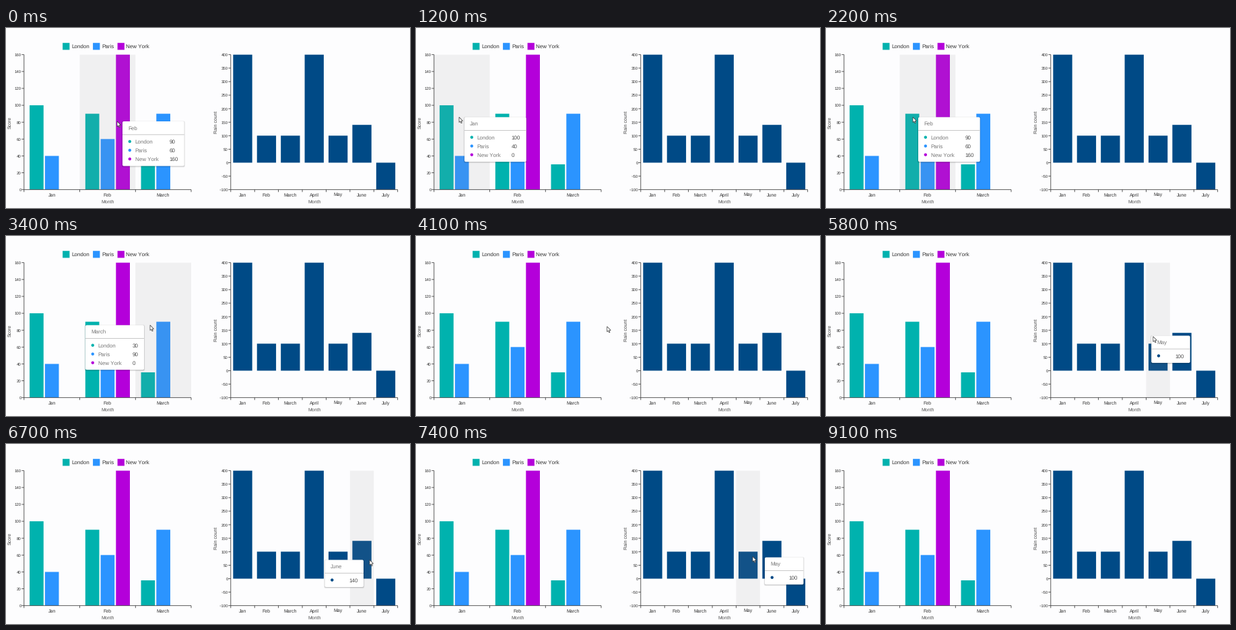
These frames come from a looping animation (600 px wide and 268 px high, 9200 ms). A matplotlib script:

```python
import matplotlib.pyplot as plt
import numpy as np
from matplotlib.animation import FuncAnimation
from matplotlib.patches import Circle, FancyBboxPatch, Polygon, Rectangle

W, H, DPI = 600, 268, 100
FRAMES, INTERVAL = 92, 100
PT = 72 / DPI
TOP, BOTTOM = 39.7, 240.7
BACKGROUND, INK, GREY = "#fdfdfe", "#333333", "#777777"
TEAL, BLUE, PURPLE, NAVY = "#00b2ae", "#2b94ff", "#b400da", "#004a86"

plt.rcParams["font.family"] = "Liberation Sans"
plt.rcParams["text.hinting"] = "none"
plt.rcParams["text.hinting_factor"] = 1
plt.rcParams["toolbar"] = "None"

fig = plt.figure(figsize=(W / DPI, H / DPI), dpi=DPI, facecolor=BACKGROUND)
ax = fig.add_axes([0, 0, 1, 1])
ax.set_xlim(0, W)
ax.set_ylim(H, 0)
ax.axis("off")


def text(x, mid, label, size, color=INK, ha="left", z=3):
    return ax.text(x, mid + 0.36 * size, label, fontsize=size * PT, color=color,
                   ha=ha, va="baseline", zorder=z)


def rect(x, y, w, h, color, z=2, alpha=1):
    return ax.add_patch(Rectangle((x, y), w, h, fc=color, lw=0, alpha=alpha,
                                  zorder=z, snap=False))


def line(xs, ys, color=INK, width=0.8, z=3):
    return ax.plot(xs, ys, color=color, lw=width * PT, zorder=z, snap=False,
                   solid_capstyle="butt")[0]


class Chart:
    def __init__(self, left, right, limit, months, series, ticks, title):
        self.left, self.right, self.limit = left, right, limit
        self.months, self.series = months, series
        self.band = (right - left) / len(months)
        self.low, self.high = ticks[0], ticks[-1]
        self.draw(ticks, title)

    def y(self, value):
        return BOTTOM - (value - self.low) / (self.high - self.low) * (BOTTOM - TOP)

    def draw(self, ticks, title):
        n = len(self.series)
        width = 0.8 * self.band / (n + 0.1 * (n - 1))
        for k, (_, color, values) in enumerate(self.series):
            for i, value in enumerate(values):
                x = self.left + (i + 0.1) * self.band + 1.1 * k * width
                rect(x, self.y(value), width, self.y(0) - self.y(value), color)

        line([self.left] * 2, [TOP, BOTTOM])
        line([self.left, self.right], [BOTTOM] * 2)
        for value in ticks:
            y = self.y(value)
            line([self.left - 3.5, self.left], [y, y])
            text(self.left - 4, y, str(value).replace("-", "−"), 6.5, ha="right")
        for i, month in enumerate(self.months):
            text(self.left + (i + 0.5) * self.band, 248.3, month, 6.6, ha="center")
        for i in range(len(self.months) + 1):
            x = self.left + i * self.band
            line([x, x], [BOTTOM, BOTTOM + 3.5])
        middle = (self.left + self.right) / 2
        text(middle, 257.8, "Month", 7.4, "#555555", "center")
        ax.text(self.left - 21.3, 140.5, title, fontsize=7.4 * PT, color="#444444",
                rotation=90, ha="center", va="center", zorder=3)

    def index(self, x, y):
        """Category under the pointer, or None."""
        if self.left <= x < self.right and TOP <= y <= BOTTOM:
            return int((x - self.left) / self.band)
        return None

    def tip_size(self, i):
        digits = max(len(str(s[2][i])) for s in self.series)
        value_x = 69.7 if self.series[0][0] else 35.5
        return value_x, value_x + 4.67 * digits + 8, 27.5 + 13 * len(self.series)

    def tip_target(self, x, y):
        width = self.tip_size(self.index(x, y))[1]
        left = x + 8 if x + 8 + width <= self.limit else x - 9 - width
        return left, y


cities = Chart(26.8, 275, 300, ["Jan", "Feb", "March"],
               [("London", TEAL, [100, 90, 30]),
                ("Paris", BLUE, [40, 60, 90]),
                ("New York", PURPLE, [0, 160, 0])],
               range(0, 161, 20), "Score")
rain = Chart(333.8, 581.7, 600,
             ["Jan", "Feb", "March", "April", "May", "June", "July"],
             [("", NAVY, [400, 100, 100, 400, 100, 140, -100])],
             range(-100, 401, 50), "Rain count")

for swatch_x, (name, color, _) in zip((84.1, 129.1, 165.6), cities.series):
    rect(swatch_x, 22.2, 10.3, 10.3, color)
    text(swatch_x + 12.8, 27.3, name, 8.1)

# Pointer stops: frame, x, y
STOPS = np.array([
    (0, 165, 139), (1, 165, 139), (10, 64, 132.7), (13, 64, 132.7),
    (20, 129, 132.7), (23, 129, 132.7), (32, 214, 132.7), (36, 214, 132.7),
    (40, 266, 134), (44, 337, 137), (47, 380, 140), (50, 401, 140),
    (60, 507, 152), (63, 532, 165), (65, 540, 172.5), (70, 540, 172.5),
    (80, 440, 160), (86, 400, 55), (88, 392, -15), (91, 392, -15)])
ARROW = np.array([(0, 0), (0, 7.8), (1.8, 6.2), (3, 9), (4.3, 8.5),
                  (3.1, 5.8), (5.5, 5.6)])


def pointer(frame):
    return tuple(np.interp(frame, STOPS[:, 0], STOPS[:, k]) for k in (1, 2))


def tip_position(chart, frame):
    """The box trails the pointer by averaging its latest targets."""
    recent = [pointer(f) for f in range(max(0, frame - 2), frame + 1)]
    targets = [chart.tip_target(*p) for p in recent if chart.index(*p) is not None]
    return np.mean(targets, axis=0)


def rounded(x, y, w, h, color, alpha, z):
    return ax.add_patch(FancyBboxPatch((x, y), w, h, fc=color, lw=0, alpha=alpha,
                                       boxstyle="round,pad=0,rounding_size=2",
                                       zorder=z, snap=False))


def tooltip(chart, i, x, y):
    value_x, w, h = chart.tip_size(i)
    parts = [rounded(x - g, y - g + 0.7, w + 2 * g, h + 2 * g, "black", 0.07, 5)
             for g in (0.2, 0.6, 1.2)]
    parts += [rounded(x, y, w, h, "white", 1, 6),
              text(x + 8, y + 9.5, chart.months[i], 8.3, GREY, z=7),
              line([x, x + w], [y + 19.8, y + 19.8], "#c8c8c8", 1, 7)]
    for k, (name, color, values) in enumerate(chart.series):
        mid = y + 30 + 13 * k
        dot = Circle((x + 10.8, mid), 2.2, fc=color, lw=0, zorder=7)
        parts += [ax.add_patch(dot),
                  text(x + 18.7, mid, name, 8.2, GREY, z=7),
                  text(x + value_x, mid, str(values[i]), 8.5, "#4c4c4c", z=7)]
    return parts


live = []


def update(frame):
    while live:
        live.pop().remove()
    x, y = pointer(frame)
    for chart in (cities, rain):
        i = chart.index(x, y)
        if i is not None:
            live.append(rect(chart.left + i * chart.band, TOP, chart.band,
                             BOTTOM - TOP, "#96939a", 2.5, 0.12))
            live.extend(tooltip(chart, i, *tip_position(chart, frame)))
    live.append(ax.add_patch(Polygon(ARROW + (x, y), closed=True, fc="white",
                                     ec="#333333", lw=0.7 * PT, zorder=9)))
    return live


anim = FuncAnimation(fig, update, frames=FRAMES, interval=INTERVAL,
                     init_func=lambda: [], repeat=True, repeat_delay=0, blit=False)
plt.show()
```
